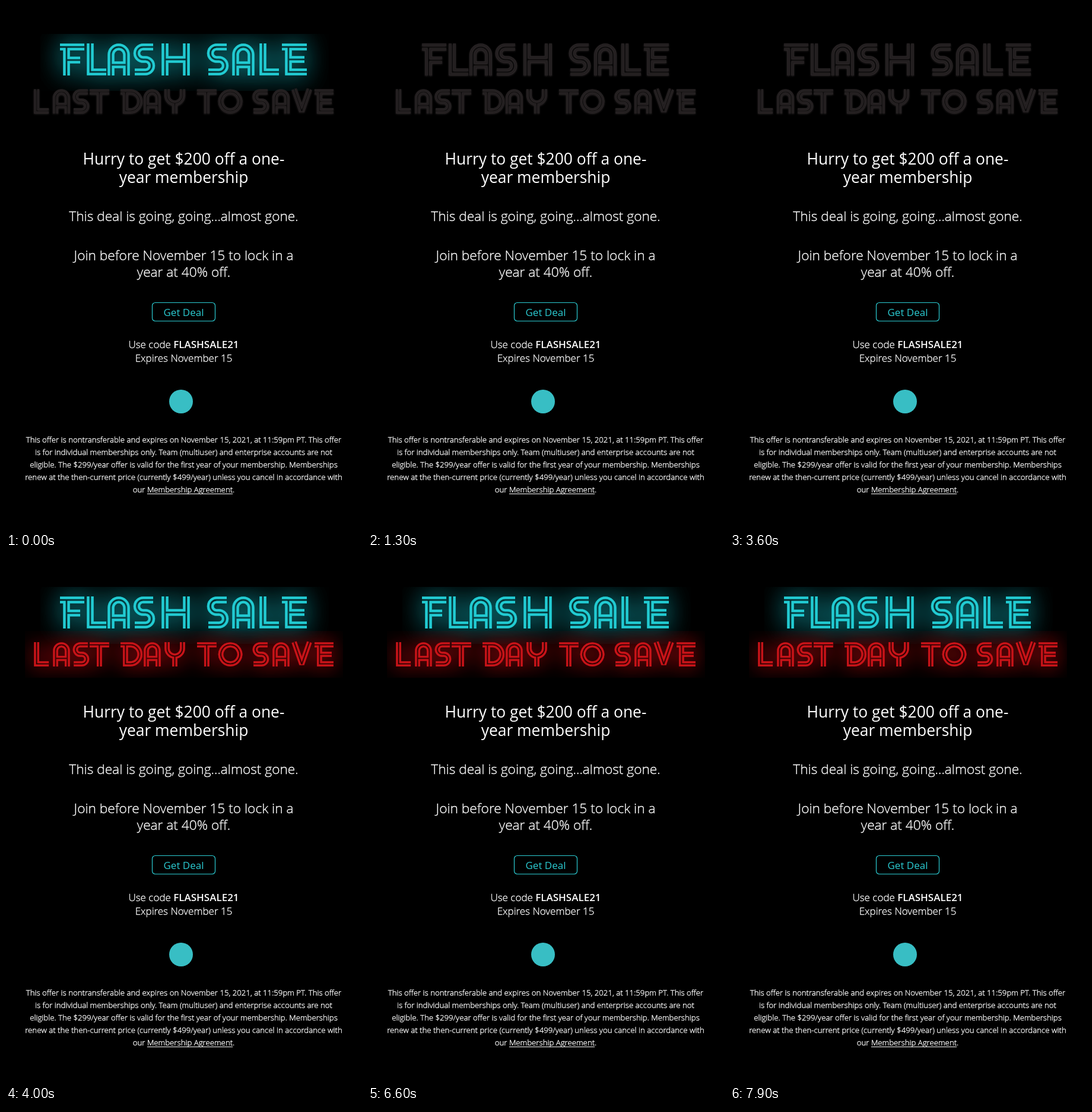
An HTML page with a canvas for the animation above (8000 ms loop, 600 by 884 pixels).

```html
<!DOCTYPE html>
<html lang="en">
<head>
<meta charset="utf-8">
<title>Flash Sale</title>
<style>
html, body { margin: 0; width: 100%; height: 100%; overflow: hidden; background: #000; }
canvas { display: block; }
</style>
</head>
<body>
<canvas id="stage" width="600" height="884"></canvas>
<script>
const W = 600, H = 884, LOOP = 8000, MID = 299.5;
const TEAL = '#2bccd3';
const stage = document.getElementById('stage').getContext('2d');

// Centre lines of the sign letters, 54 units high.
const GLYPHS = {
  F: 'M0 6H41M11 6V54M11 28H34',
  L: 'M6 0V48H33',
  A: 'M6 54V19A13 13 0 0 1 32 19V54M6 36H32',
  S: 'M34 6H17A10.5 10.5 0 0 0 17 27H21A10.5 10.5 0 0 1 21 48H3',
  H: 'M6 0V54M42 0V54M6 27H42',
  E: 'M0 6H42M11 6V48H42M11 27H38',
  T: 'M0 6H43M21.5 6V54',
  D: 'M0 6H22A21 21 0 0 1 22 48H11V6',
  Y: 'M6 0V14A17 17 0 0 0 40 14V0M23 31V54',
  O: 'M26.5 6A21 21 0 1 1 26.4 6Z',
  V: 'M6 0L23 49L40 0'
};

const SALE = {
  letters: 'FLASHSALE',
  xs: [91, 136, 171, 214, 262, 338, 381, 427, 465],
  y: 63, scale: 1,
  lit: '#22ccd3', edge: '#158f95', glow: '#0c848b', blur: 44,
  box: [58, 47, 486, 96]
};
const LAST = {
  letters: 'LASTDAYTOSAVE',
  xs: [47, 79, 112, 141, 193, 232, 267, 322, 358, 415, 449, 481, 520],
  y: 140, scale: 0.76,
  lit: '#c91419', edge: '#8c0a0e', glow: '#8a0609', blur: 34,
  box: [32, 121, 536, 79]
};

function layer(draw) {
  const c = document.createElement('canvas');
  c.width = W;
  c.height = H;
  draw(c.getContext('2d'));
  return c;
}

// A wide stroke with its middle erased leaves a pair of parallel tubes.
function tubes(line, color, outer, inner) {
  return layer(g => {
    const strokeAll = width => {
      g.lineWidth = width;
      [...line.letters].forEach((ch, i) => {
        g.setTransform(line.scale, 0, 0, line.scale, line.xs[i], line.y);
        g.stroke(new Path2D(GLYPHS[ch]));
      });
    };
    g.miterLimit = 2;
    g.strokeStyle = color;
    strokeAll(outer);
    g.globalCompositeOperation = 'destination-out';
    strokeAll(inner);
  });
}

function litSign(line) {
  return layer(g => {
    g.beginPath();
    g.rect(...line.box);
    g.clip();
    const edge = tubes(line, line.edge, 11.6, 2.8);
    g.shadowColor = line.glow;
    g.shadowBlur = line.blur;
    g.drawImage(edge, 0, 0);
    g.drawImage(edge, 0, 0);
    g.shadowColor = 'transparent';
    g.drawImage(tubes(line, line.lit, 11, 3.4), 0, 0);
  });
}

function darkSign(line) {
  return layer(g => {
    g.shadowColor = '#2a2526';
    g.shadowBlur = 3;
    g.shadowOffsetY = 1;
    g.drawImage(tubes(line, '#2f2a2b', 11.6, 2.8), 0, 0);
    g.shadowColor = 'transparent';
    g.drawImage(tubes(line, '#221e1f', 10.2, 4.4), 0, 0);
  });
}

function font(g, weight, size) {
  g.font = `${weight} ${size}px "Open Sans", "Noto Sans", sans-serif`;
}

// Draws runs of [text, weight, underlined] as one centred line.
function runs(g, parts, size, y) {
  const widths = parts.map(([text, weight]) => {
    font(g, weight, size);
    return g.measureText(text).width;
  });
  let x = MID - widths.reduce((a, b) => a + b, 0) / 2;
  parts.forEach(([text, weight, underlined], i) => {
    font(g, weight, size);
    g.fillText(text, x, y);
    // Light type is thickened a little so that it stays bright.
    if (weight < 400) g.strokeText(text, x, y);
    if (underlined) g.fillRect(x, y + 2, widths[i], 1);
    x += widths[i];
  });
}

function text(g, lines, weight, size, y, pitch) {
  lines.forEach((line, i) => runs(g, [[line, weight]], size, y + i * pitch));
}

const page = layer(g => {
  g.fillStyle = '#000';
  g.fillRect(0, 0, W, H);
  g.fillStyle = g.strokeStyle = '#fff';
  g.lineWidth = 0.35;
  g.lineJoin = 'round';
  text(g, ['Hurry to get $200 off a one-', 'year membership'], 400, 26.4, 267, 30.5);
  text(g, ['This deal is going, going...almost gone.'], 300, 22.7, 362, 0);
  text(g, ['Join before November 15 to lock in a', 'year at 40% off.'], 300, 22.7, 428, 28);
  runs(g, [['Use code ', 300], ['FLASHSALE21', 600]], 17, 576);
  text(g, ['Expires November 15'], 300, 17, 599, 0);
  text(g, [
    'This offer is nontransferable and expires on November 15, 2021, at 11:59pm PT. This offer',
    'is for individual memberships only. Team (multiuser) and enterprise accounts are not',
    'eligible. The $299/year offer is valid for the first year of your membership. Memberships',
    'renew at the then-current price (currently $499/year) unless you cancel in accordance with'
  ], 300, 13.22, 735, 21);
  runs(g, [['our ', 300], ['Membership Agreement', 300, true], ['.', 300]], 13.22, 819);

  g.strokeStyle = g.fillStyle = TEAL;
  g.lineWidth = 1.2;
  g.beginPath();
  g.roundRect(246.5, 499.5, 106, 31, 5);
  g.stroke();
  text(g, ['Get Deal'], 400, 17, 522, 0);

  g.fillStyle = '#38bec4';
  g.beginPath();
  g.arc(295, 666, 20, 0, Math.PI * 2);
  g.fill();
});

// Spans in ms during which each sign is lit.
const signs = [
  { line: SALE, spans: [[0, 1300], [1400, 1600], [3100, 3600], [4000, LOOP]] },
  { line: LAST, spans: [[300, 1300], [1400, 1600], [4000, LOOP]] }
].map(s => ({ spans: s.spans, lit: litSign(s.line), dark: darkSign(s.line) }));

function render(t) {
  stage.drawImage(page, 0, 0);
  for (const s of signs) {
    const on = s.spans.some(([from, to]) => t >= from && t < to);
    stage.drawImage(on ? s.lit : s.dark, 0, 0);
  }
}

const start = performance.now();
function tick() {
  render((performance.now() - start) % LOOP);
  requestAnimationFrame(tick);
}
tick();
</script>
</body>
</html>
```
